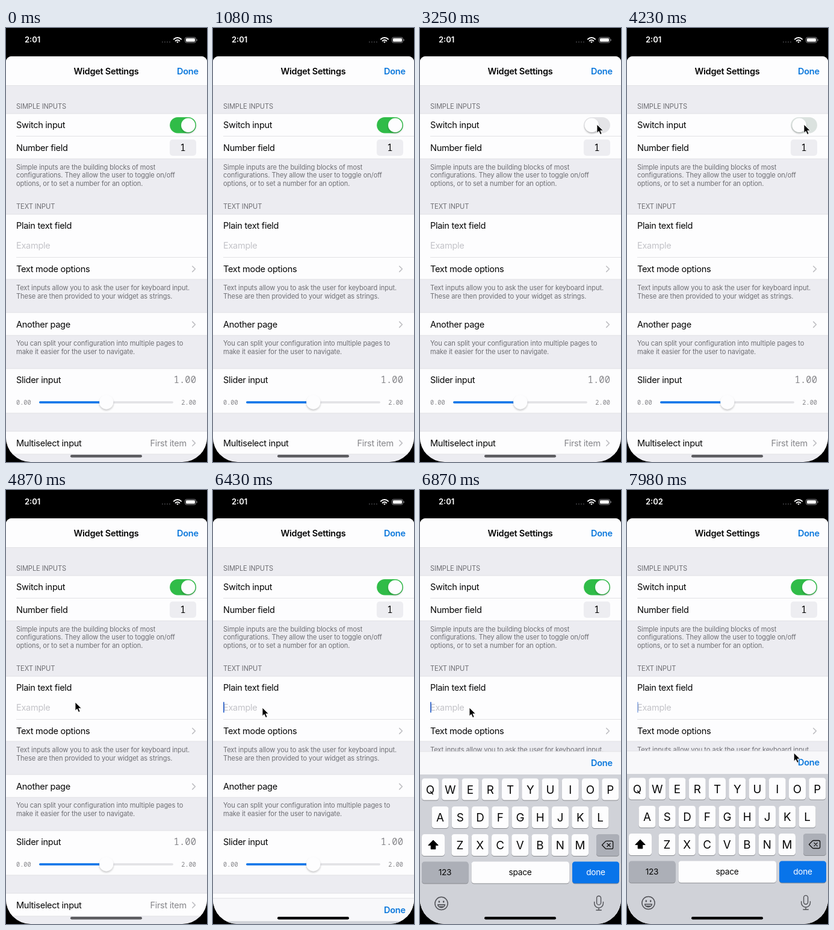
Recreate the animation shown at these times as an HTML page. Size 334 by 720 pixels, loop 8 s.

```html
<!DOCTYPE html>
<html lang="en">
<head>
<meta charset="utf-8">
<title>Widget Settings</title>
<style>
  html, body { margin: 0; width: 100%; height: 100%; overflow: hidden; background: #000; }
  svg { display: block; width: 100vw; height: 100vh; }
  text { font: 14.56px Inter, sans-serif; letter-spacing: -.29px; fill: #050505; white-space: pre; }
  .bold { font-weight: 600; }
  .small { font-size: 11.13px; letter-spacing: -.1px; fill: #6f6f74; }
  .mono { font: 15.6px "Noto Sans Mono", monospace; letter-spacing: 0; }
  .tiny { font-size: 10.3px; }
  .grey { fill: #87878b; }
  .hint { fill: #c3c3c8; }
  .link { fill: #0b78dc; }
  .mid { text-anchor: middle; }
  .end { text-anchor: end; }
  .letter { font-size: 18.8px; letter-spacing: 0; }
  .label { font-size: 13.7px; letter-spacing: -.25px; }
  .white { fill: #fff; }
  .clock { font-size: 13px; letter-spacing: 0; }
  .line { fill: none; stroke-linecap: round; stroke-linejoin: round; }
</style>
</head>
<body>
<svg id="stage" viewBox="0 0 334 720" preserveAspectRatio="none"></svg>
<script>
const LOOP = 8000;
const PAGE = '#ececf1', CELL = '#fdfdfe', RULE = '#e2e2e5', BLUE = '#0874ea';
const KEY = '#fdfdfe', DARK_KEY = '#acafb7', BOARD = '#d0d2d8', ICON = '#505156';

const text = (x, y, str, cls = '') => `<text x="${x}" y="${y}" class="${cls}">${str}</text>`;
const rect = (x, y, w, h, fill, r = 0) =>
  `<rect x="${x}" y="${y}" width="${w}" height="${h}" rx="${r}" fill="${fill}"/>`;
const line = (d, stroke, width) => `<path class="line" d="${d}" stroke="${stroke}" stroke-width="${width}"/>`;
const chevron = y => line(`M309.8 ${y - 4.6}l4.6 4.6l-4.6 4.6`, '#bebec2', 1.6);
const section = (top, bottom) =>
  rect(0, top, 334, bottom - top, CELL) + rect(0, top - .5, 334, 1, RULE) + rect(0, bottom - .5, 334, 1, RULE);
const inset = y => rect(17, y, 317, 1, RULE);
const notes = (y, ...rows) => rows.map((row, i) => text(17, y + i * 13.8, row, 'small')).join('');

const statusBar = () =>
  `<text id="clock" x="31" y="24.3" class="clock bold white"></text>` +
  [259, 263, 267, 271].map(x => rect(x, 22.5, 2, 1.6, '#55555a', .8)).join('') +
  line('M278.9 18.6a8.6 8.6 0 0 1 12.2 0', '#fff', 2) +
  line('M281.6 21.4a4.8 4.8 0 0 1 6.8 0', '#fff', 1.9) +
  '<path d="M283.2 23.1a2.6 2.6 0 0 1 3.6 0l-1.8 1.9z" fill="#fff"/>' +
  '<rect x="297.5" y="15.5" width="18" height="8.8" rx="2.6" fill="none" stroke="#909094"/>' +
  rect(299, 17, 15, 5.8, '#fff', 1.4) + rect(316.6, 18.4, 1.2, 3, '#909094', .6);

const settings = () =>
  rect(0, 47, 334, 673, PAGE) +
  rect(0, 47, 334, 48, CELL) + rect(0, 95, 334, 1, RULE) +
  text(166.5, 76.5, 'Widget Settings', 'bold mid') + text(284, 76.5, 'Done', 'bold link') +

  text(17, 133.5, 'SIMPLE INPUTS', 'small') +
  section(142, 217) + inset(179) +
  text(17, 166.3, 'Switch input') +
  '<rect id="track" x="272.2" y="148" width="43.8" height="26.4" rx="13.2"/>' +
  '<circle id="knob" cy="161.2" r="11.7" fill="#fdfdfe" filter="url(#soft)"/>' +
  text(17, 204, 'Number field') + rect(272, 185, 44, 27, '#ededf1', 5) + text(294, 204.3, '1', 'mono mid') +
  notes(234.6, 'Simple inputs are the building blocks of most',
    'configurations. They allow the user to toggle on/off', 'options, or to set a number for an option.') +

  text(17, 300.3, 'TEXT INPUT', 'small') +
  section(309, 417) + inset(380) +
  text(17, 333.2, 'Plain text field') + text(17, 366, 'Example', 'hint') +
  '<rect id="caret" x="17" y="351.5" width="1.8" height="18" rx=".9" fill="#3468cc"/>' +
  text(17, 405, 'Text mode options') + chevron(399.8) +
  notes(435.4, 'Text inputs allow you to ask the user for keyboard input.',
    'These are then provided to your widget as strings.') +

  section(472, 510) + text(17, 497, 'Another page') + chevron(492) +
  notes(527.4, 'You can split your configuration into multiple pages to',
    'make it easier for the user to navigate.') +

  section(565, 639) +
  text(17, 589, 'Slider input') + text(316, 589.2, '1.00', 'mono grey end') +
  text(17, 624.6, '0.00', 'mono tiny grey') + text(316, 624.6, '2.00', 'mono tiny grey end') +
  rect(55, 619.2, 223, 3.6, '#e2e2e5', 1.8) + rect(55, 619.2, 112, 3.6, BLUE, 1.8) +
  '<circle cx="166.7" cy="620.6" r="11.6" fill="#fdfdfe" filter="url(#soft)"/>' +

  section(669, 707) + text(17, 693.8, 'Multiselect input') +
  text(300, 693.8, 'First item', 'grey end') + chevron(688.6);

const key = (x, y, w, fill, content = '') =>
  rect(x, y + 1, w, 36, '#898b90', 4.4) + rect(x, y, w, 36, fill, 4.4) + content;
const letters = (row, firstCenter, y) => [...row].map((ch, i) => {
  const cx = firstCenter + i * 33.25;
  return key(cx - 14, y, 28, KEY, text(cx, y + 25.3, ch, 'letter mid'));
}).join('');
const eye = x => `<ellipse cx="${x}" cy="682" rx="1.3" ry="1.8" fill="${ICON}"/>`;

const keyboard = () =>
  rect(0, 433, 334, 38.5, '#f8f8fa') + rect(0, 432.5, 334, 1, RULE) +
  text(284, 457.4, 'Done', 'bold link') +
  rect(0, 471, 334, 250, BOARD) +
  letters('QWERTYUIOP', 17, 477.5) + letters('ASDFGHJKL', 33.5, 524) + letters('ZXCVBNM', 66.5, 570) +
  key(3, 570, 38, KEY, '<path d="M22 580l8.2 8.4h-4.4v6.4h-7.6v-6.4h-4.4z" stroke="#000" stroke-linejoin="round"/>') +
  key(293, 570, 38, DARK_KEY,
    line('M302.5 588l5.6-5.8q.8-.7 1.8-.7h8.6q2.2 0 2.2 2.2v8.6q0 2.2-2.2 2.2h-8.6q-1 0-1.8-.7z', '#111', 1.3) +
    line('M311 585.4l5.2 5.2m0-5.2l-5.2 5.2', '#111', 1.3)) +
  key(3, 615.5, 77.5, DARK_KEY, text(41.5, 638.2, '123', 'label mid')) +
  key(85.5, 615.5, 162.5, KEY, text(166.5, 638.2, 'space', 'label mid')) +
  key(253, 615.5, 78, BLUE, text(292, 638.2, 'done', 'label mid white')) +
  `<circle cx="35.5" cy="685" r="10.6" fill="none" stroke="${ICON}" stroke-width="1.5"/>` +
  eye(31.8) + eye(39.2) +
  `<path d="M28.8 686.4h13.4a6.7 6.2 0 0 1-13.4 0z" fill="${ICON}"/>` +
  `<path d="M30.6 688h9.8l-.7 1.5h-8.4z" fill="${BOARD}"/>` +
  `<rect x="293.6" y="672.6" width="7" height="14.6" rx="3.5" fill="none" stroke="${ICON}" stroke-width="1.4"/>` +
  line('M289.7 682.6v2.2a7.4 7.4 0 0 0 14.8 0v-2.2M297.1 692.2v3.8M292.9 696h8.4', ICON, 1.4);

const $ = id => document.getElementById(id);
$('stage').innerHTML = `
  <defs>
    <filter id="soft" x="-40%" y="-40%" width="180%" height="190%">
      <feDropShadow dx="0" dy="2" stdDeviation="1.8" flood-color="#222" flood-opacity=".26"/>
    </filter>
    <clipPath id="sheet"><path d="M0 56a9 9 0 0 1 9-9h316a9 9 0 0 1 9 9v623a41 41 0 0 1-41 41h-252a41 41 0 0 1-41-41z"/></clipPath>
  </defs>
  <rect width="334" height="720"/>
  ${statusBar()}
  <g clip-path="url(#sheet)">
    ${settings()}
    <g id="keyboard">${keyboard()}</g>
    <rect id="home" x="107" y="708" width="119" height="4.4" rx="2.2"/>
  </g>
  <path id="cursor" d="M0 0v14.2l3.2-3l2.4 5.4l2.6-1.1l-2.4-5.3h4.6z" fill="#000" stroke="#fff" stroke-width=".9" stroke-linejoin="round"/>`;

// Steps are [time, value]; values are eased from one step to the next.
const smooth = p => p * p * (3 - 2 * p);
function at(steps, t) {
  const i = steps.findIndex(step => step[0] > t);
  if (i === 0) return steps[0][1];
  if (i < 0) return steps[steps.length - 1][1];
  const [[t0, a], [t1, b]] = [steps[i - 1], steps[i]];
  return a + (b - a) * smooth((t - t0) / (t1 - t0));
}
const path = [
  [1700, -14, 84], [2020, 223, 142], [2450, 294, 160], [4330, 294, 160],
  [4800, 115, 352], [5550, 115, 352], [5900, 82, 361], [7460, 82, 361], [8020, 280, 437]
];
const cursorX = path.map(([t, x]) => [t, x]), cursorY = path.map(([t, , y]) => [t, y]);
const switchOn = [[2850, 1], [3080, 0], [4200, 0], [4430, 1]];
const caretOn = [[6950, 1], [7080, 0], [7330, 0], [7450, 1], [7900, 1], [8060, 0]];
const FOCUS = 6389;

function spring(ms) {
  const x = Math.max(0, ms) * .0164;
  return 1 - (1 + x) * Math.exp(-x);
}
const mix = (a, b, p) => `rgb(${a.map((v, i) => Math.round(v + (b[i] - v) * p))})`;

function draw(t) {
  const on = at(switchOn, t);
  $('knob').setAttribute('cx', 285.3 + 17.5 * on);
  $('track').setAttribute('fill', mix([228, 228, 231], [48, 188, 72], on));

  $('cursor').setAttribute('transform', `translate(${at(cursorX, t)} ${at(cursorY, t)})`);
  $('cursor').setAttribute('visibility', t < 1700 ? 'hidden' : 'visible');

  const focused = t >= FOCUS;
  $('caret').setAttribute('opacity', focused ? at(caretOn, t) : 0);
  $('keyboard').setAttribute('transform', `translate(0 ${288 * (1 - spring(t - FOCUS))})`);
  $('home').setAttribute('fill', focused ? '#000' : '#5c5c60');
  $('clock').textContent = t < 7500 ? '2:01' : '2:02';
}

const start = performance.now();
function tick() {
  draw((performance.now() - start) % LOOP);
  requestAnimationFrame(tick);
}
tick();
</script>
</body>
</html>
```
